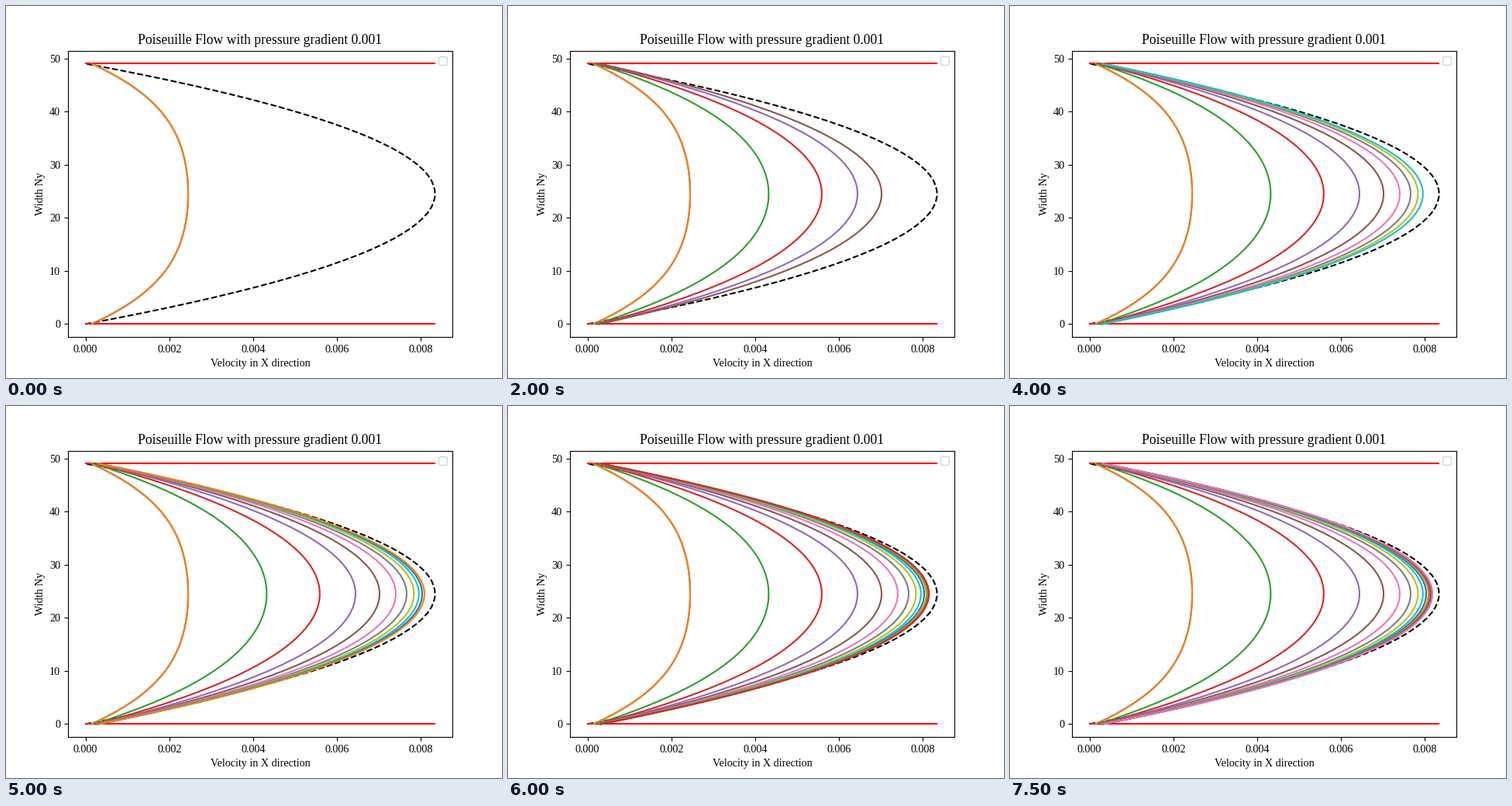
Animation of 640 by 480 pixels, one loop 8 s. Source, as a matplotlib script:

```python
import numpy as np
import matplotlib.pyplot as plt
from matplotlib.animation import FuncAnimation

FRAMES, INTERVAL = 16, 500
NY = 50
U_EXACT = 600 / 72000   # peak of the analytic profile
U_STEADY = 0.008195     # peak the simulation settles at
DECAY = 0.673           # slowest mode's decay per step
LAG = 0.028

plt.rcParams.update({"font.family": "Liberation Serif", "font.size": 10.2})

y = np.arange(NY)


def profile(step):
    """Start-up channel flow with walls half a cell outside the grid."""
    eta = (y + 0.5) / NY
    u = 4 * eta * (1 - eta)
    for n in range(1, 12, 2):
        fade = DECAY ** (n * n * (step - LAG))
        u -= 32 / (np.pi * n) ** 3 * np.sin(n * np.pi * eta) * fade
    return U_STEADY * u


fig, ax = plt.subplots(figsize=(6.4, 4.8), dpi=100)
exact = y * (NY - 1 - y) / 72000
ax.plot(exact, y, "k--")
for wall in (0, NY - 1):
    ax.plot([0, U_EXACT], [wall, wall], "r-")

ax.plot(profile(1), y, color="C0")
curves = [ax.plot(profile(k + 1), y, color=f"C{(k + 1) % 10}")[0]
          for k in range(FRAMES)]

ax.set_xlim(-0.05 * U_EXACT, 1.05 * U_EXACT)
ax.set_ylim(-0.05 * (NY - 1), 1.05 * (NY - 1))
ax.set_xticks(np.arange(0, 0.009, 0.002))
ax.set_title("Poiseuille Flow with pressure gradient 0.001", fontsize=12.7)
ax.set_xlabel("Velocity in X direction")
ax.set_ylabel("Width Ny")
ax.legend(handles=[], loc="upper right", fontsize=10)


def update(frame):
    for k, curve in enumerate(curves):
        curve.set_visible(k <= frame)
    return curves


anim = FuncAnimation(fig, update, frames=FRAMES, interval=INTERVAL,
                     repeat=True, repeat_delay=0)
plt.show()
```
